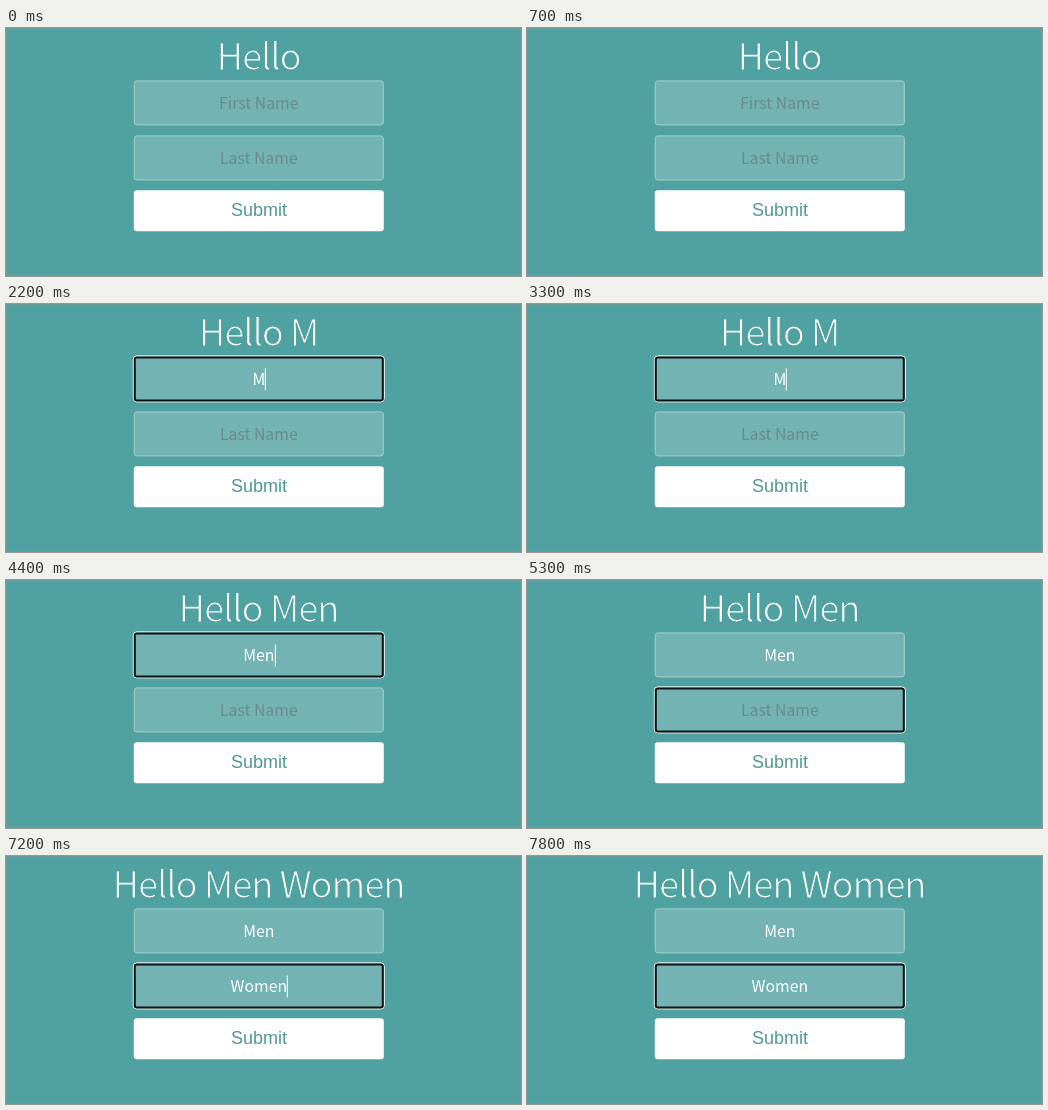
Recreate the animation shown at these times as an HTML page. Size 515 px wide and 248 px high, loop 8000 ms.

```html
<!DOCTYPE html>
<html lang="en">
<head>
<meta charset="utf-8">
<title>Greeting form</title>
<style>
  html, body { margin: 0; width: 100%; height: 100%; overflow: hidden; background: #50a1a1; }
  svg { display: block; width: 515px; height: 248px; }
  text { font: 15.8px "Noto Sans CJK JP", "Noto Sans CJK SC", "Noto Sans", sans-serif; text-anchor: middle; fill: #fff; }
  /* The background-coloured stroke slims the regular weight to a light one. */
  .title { font-size: 36.6px; letter-spacing: -1.15px; stroke: #50a1a1; stroke-width: 1.2px; }
  .empty { fill: #6a8b8b; }
  .submit { font: 18px "Liberation Sans", Arial, sans-serif; fill: #4f9896; }
  .box { fill: #73b3b4; stroke: #a5cfcf; }
  .ring, .halo { fill: none; }
  .ring { stroke: #0c1212; stroke-width: 2; }
  .halo { stroke: #fff; }
</style>
</head>
<body>
<svg viewBox="0 0 515 248">
  <rect width="515" height="248" fill="#50a1a1"/>
  <rect x=".5" y=".5" width="514" height="247" fill="none" stroke="#689b9c"/>
  <text class="title" x="252.5" y="42">Hello</text>
  <g class="field" transform="translate(-.2 -.6)"></g>
  <g class="field" transform="translate(-.2 54.4)"></g>
  <rect x="127.8" y="162.3" width="250" height="41" rx="3" fill="#fff"/>
  <text class="submit" x="253" y="188">Submit</text>
</svg>
<script>
const LOOP = 8000, CENTER = 253;
const svg = document.querySelector('svg');
const title = svg.querySelector('.title');
const labels = ['First Name', 'Last Name'];

const fields = [...svg.querySelectorAll('.field')].map((group, i) => {
  group.innerHTML = `
    <rect class="box" x="128.5" y="53.5" width="249" height="44" rx="2.5"/>
    <g class="focus">
      <rect class="halo" x="127.5" y="52.5" width="251" height="46" rx="3.5"/>
      <rect class="ring" x="129" y="54" width="248" height="43" rx="2"/>
    </g>
    <text class="value" x="${CENTER}" y="82">${labels[i]}</text>
    <rect class="caret" y="65" width="1" height="22" fill="#fff"/>`;
  const part = name => group.querySelector(name);
  return { focus: part('.focus'), value: part('.value'), caret: part('.caret'), label: labels[i] };
});

// time, focused field, first name, last name, caret visible
const steps = [
  [0, -1, '', '', 0],
  [1000, 0, '', '', 1],
  [1600, 0, '', '', 0],
  [2000, 0, '', '', 1],
  [2200, 0, 'M', '', 1],
  [2800, 0, 'M', '', 0],
  [3300, 0, 'M', '', 1],
  [3800, 0, 'Me', '', 1],
  [4400, 0, 'Men', '', 1],
  [4700, 1, 'Men', '', 1],
  [5300, 1, 'Men', '', 0],
  [5500, 1, 'Men', 'W', 1],
  [5600, 1, 'Men', 'Wo', 1],
  [5800, 1, 'Men', 'Wom', 1],
  [5900, 1, 'Men', 'Wome', 1],
  [6100, 1, 'Men', 'Women', 1],
  [6600, 1, 'Men', 'Women', 0],
  [7200, 1, 'Men', 'Women', 1],
  [7700, 1, 'Men', 'Women', 0]
];

function show([, active, first, last, caretOn]) {
  const names = [first, last];
  title.textContent = ['Hello', ...names].filter(Boolean).join(' ');
  fields.forEach(({ focus, value, caret, label }, i) => {
    const name = names[i];
    value.textContent = name || label;
    value.classList.toggle('empty', !name);
    focus.style.display = i === active ? '' : 'none';
    caret.style.display = i === active && caretOn ? '' : 'none';
    const end = CENTER + (name ? value.getComputedTextLength() / 2 : 0);
    caret.setAttribute('x', Math.round(end));
  });
}

const start = performance.now();
let current;
function tick() {
  const time = (performance.now() - start) % LOOP;
  const step = steps.filter(([at]) => at <= time).pop();
  if (step !== current) show(current = step);
  requestAnimationFrame(tick);
}
tick();
</script>
</body>
</html>
```
